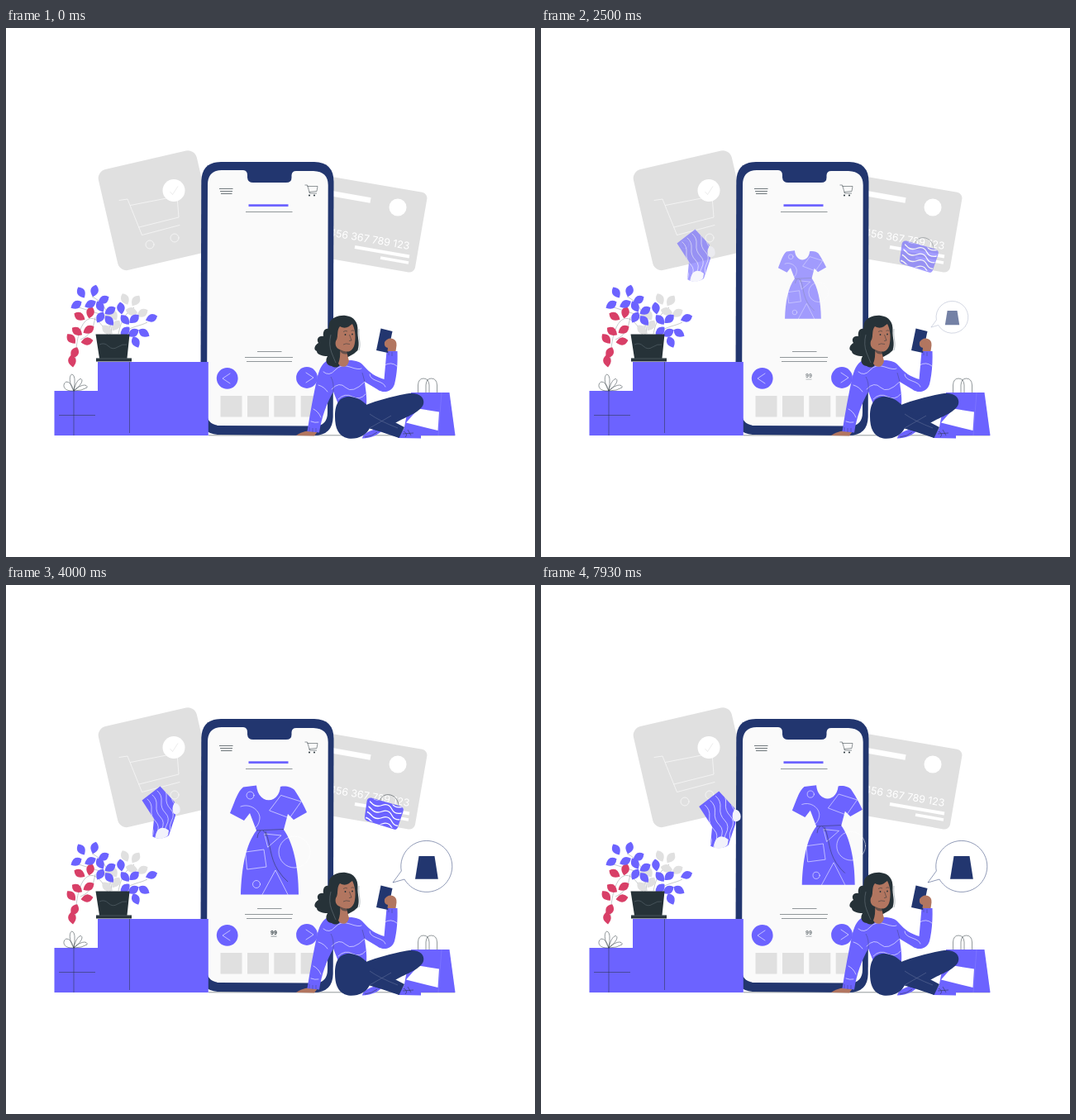
An HTML page that plays this animation: 640 by 640 pixels, repeating every 8 s.

```html
<!DOCTYPE html>
<html lang="en">
<head>
<meta charset="utf-8">
<title>Online shopping</title>
<style>
html, body { margin: 0; width: 100%; height: 100%; overflow: hidden; background: #fff; }
svg { display: block; width: 100vw; height: 100vh; }
.violet { fill: #6c63ff; }
.navy { fill: #22366f; }
.dark { fill: #263238; }
.skin { fill: #b27660; }
.grey { fill: #e0e0e0; }
.white { fill: #fff; }
.ink { fill: none; stroke: #263238; stroke-width: .5; }
.chalk { fill: none; stroke: #fff; stroke-width: .6; stroke-linecap: round; stroke-linejoin: round; }
text { font-family: Inter, sans-serif; }
</style>
</head>
<body>
<svg viewBox="0 0 640 640">
  <defs>
    <clipPath id="bagClip"><path d="M441 258L480.500 269L473 295.500L434.500 284Z"/></clipPath>
    <clipPath id="sockClip"><path id="sockShape" d="M164.500 260.500L186.500 243.500L204 262.500C203 268 205 272 205 279L197 303C192 307 183 308 177 304L179 283Z"/></clipPath>
  </defs>

  <g id="cardLeft">
    <rect class="grey" width="122" height="125" rx="11" transform="translate(109.500 173.500) rotate(-13)"/>
    <circle class="white" cx="203" cy="196.500" r="13.500"/>
    <path d="M198.500 198L201.500 201.500L208 191.500" fill="none" stroke="#e0e0e0" stroke-width=".6"/>
    <path class="chalk" d="M137 208.500L147 207L164.500 250.500L210 238.500M150.500 214.500L207 203.500L209 229L161 241"/>
    <circle class="chalk" cx="174" cy="262" r="5"/>
    <circle class="chalk" cx="204" cy="254" r="5"/>
  </g>

  <g id="cardRight">
    <rect class="grey" x="-150" width="150" height="98" rx="7" transform="translate(510.500 200) rotate(9.800)"/>
    <path d="M390 199.500L441 208.500" stroke="#fff" stroke-width="6.500"/>
    <circle class="white" cx="474" cy="217" r="10.500"/>
    <text class="white" font-size="12.400" text-anchor="end" transform="translate(487.500 268) rotate(9.800)">456 367 789 123</text>
    <path d="M422 265L488 276.500" stroke="#fff" stroke-width="4"/>
    <path d="M453 278L487 284" stroke="#fff" stroke-width="3.600"/>
  </g>

  <g id="bag">
    <path class="violet" d="M442 257.500Q437 257 436.500 262L434 280Q433.500 284 437 285.500L469 295.500Q473 297 474 293L480.500 274Q482 269 477 267.500Z"/>
    <g clip-path="url(#bagClip)"><path id="bagWaves" class="chalk" style="stroke-width:1.300"/></g>
    <path class="ink" d="M453 260.500C454 251 473 250 475 266.500"/>
  </g>

  <path class="ink" d="M245 492.800H543"/>

  <g id="phone">
    <path class="navy" d="M260 162H373Q396.500 162.500 396.500 186L395.700 470Q395.500 493 372 493L258 492Q235.300 491.500 235.300 469L236.300 185Q237 162 260 162Z"/>
    <path fill="#fafafa" d="M261 172L287 172Q292 172.500 292 178V181Q292.500 187 299 187H339Q345.500 187 345.500 181V178Q346 173 351 173H372Q389.500 173.500 389.700 190L389 465Q389 481.500 373 481.500L259 481Q243 480.500 243 465L244 189Q244.500 172 261 172Z"/>
    <path class="ink" style="stroke-width:.65" d="M258 194.500H274.500M259 197.500H274M260 200.500H273.500"/>
    <path class="ink" d="M361.500 190H364.500L367.500 200H376M364.500 191.500H377L376 197.500L366.500 198.500"/>
    <circle class="dark" cx="367" cy="202.500" r="1"/><circle class="dark" cx="373" cy="202.500" r="1"/>
    <path d="M293.500 214.700H341.500" stroke="#6c63ff" stroke-width="2.700"/>
    <path class="ink" d="M290 222.500H346.500M304 391.500H333.500M289 398.500H347M291 403.500H346"/>
    <circle class="violet" cx="267.700" cy="423.800" r="12.900"/>
    <circle class="violet" cx="364" cy="423" r="12.900"/>
    <path class="chalk" d="M271 418L262 424L271 430M363 417L372 423L363 429"/>
    <path class="grey" d="M259.500 445H285.500V470.500H259.500ZM292 445H318V470.500H292ZM324.300 445H350.300V470.500H324.300ZM356.700 445H382V470.500H356.700Z"/>
  </g>

  <g id="price">
    <text class="dark" x="324" y="422.800" font-size="6" font-weight="700" text-anchor="middle">99</text>
    <path class="ink" d="M320.500 425H327.500"/>
  </g>

  <g id="sock">
    <use href="#sockShape" class="violet"/>
    <g clip-path="url(#sockClip)"><path id="sockWaves" class="chalk"/></g>
    <path fill="#f2f2fb" d="M203.500 264C209 263 212 270 210 275Q206 279 202.500 276Q200 270 203.500 264Z"/>
    <path fill="#f2f2fb" d="M184 296Q190 291 197 297L196 303Q189 309 181 306Q181 300 184 296Z"/>
  </g>

  <g id="dress">
    <path class="violet" d="M287 244.500L303 242.500C305 266 330 266 332 244C339 242.500 346 245 349 248C355 257 360 266 364 275L348 284L341 277L336 296C347 311 354 340 354 374.500H284C285 342 290 314 303 297L295 276L288 285L271 276C276 264 280 250 287 244.500Z"/>
    <g class="chalk">
      <circle cx="295.500" cy="254.500" r="4.500"/>
      <path d="M284 268C294 264 306 271 307 281C307 287 304 293 300 295M333 254.500L357 262L343 282L319 273ZM313 301L333 303L317 317ZM290 323L312 320L315 341L292 344ZM310 374.500L326 345L341 374.500"/>
      <circle cx="349" cy="323" r="19"/>
      <circle cx="303" cy="362" r="4.500"/>
    </g>
    <path class="ink" d="M303 297L336 295.500M308 297Q304 301 304 306M311 297Q315 300 314 304M314 298C320 312 319 330 329 345Q335 354 341 359"/>
  </g>

  <g id="boxes">
    <path class="violet" d="M58.500 439H111V404H244.800V493H58.500Z"/>
    <path class="ink" d="M149.500 404V490M82 439V493M64 468.500H108"/>
    <path class="ink" d="M82 439C68 440 68 430 73 428Q79 428 82 439C75 428 77 419 80 419Q85 420 82 439C85 424 92 422 92 427Q91 432 82 439C91 430 99 431 98 435Q92 439 82 439"/>
  </g>

  <g id="plant">
    <path class="ink" opacity=".5" d="M128 370C126 350 122 334 104 325M126 350L88 338M136 370C140 350 146 345 155 338M126 372C126 357 120 346 130 341M142 370C149 361 162 361 171 356M142 371Q155 368 156 376M123 372C108 338 86 345 84 401M108 350Q105 372 90 377"/>
    <g id="leaves"></g>
    <path class="dark" d="M108.500 370.500H149.500L146.500 399.500H152V403.500H109V399.500H113Z"/>
    <path d="M113 383Q119 380 124 385T135 386T146 383M109 400H152" fill="none" stroke="#64727a" stroke-width=".5"/>
  </g>

  <g id="shopper">
    <path class="violet" d="M490 441H536.500L543.500 493H480Z"/>
    <path class="white" d="M499 460.500L524 464.500L522.500 487L484 477.500Z"/>
    <path d="M527 441L523 493" stroke="#8a83ff" stroke-width=".5"/>
    <path class="ink" d="M498.500 441V432Q499 424 505 424Q511.500 424 512 432V441M508 441V432Q508.500 424 514.500 424Q521 424 521.500 432V441"/>

    <path class="skin" d="M351 493Q358 488 366 487.500L377 488L373 493.500Z"/>
    <path class="violet" d="M392 401C383 404 380 411 377 421C372 443 368 466 364.500 488L379 489.500C382 470 388 454 396 440L402 455L436 456C437 446 435 438 434 428L449 437C457 443 467 440 470 431C473 419 474 405 473.500 391H460.500L457.500 425C447 422 440 417 433 409C429 404 424 402 415 402Z"/>
    <path class="chalk" d="M384 416Q391 422 398 414T416 410T430 412M378 432Q385 434 389 440M394 437Q403 427 411 435T434 428M372 461Q378 464 381 471M369 476Q374 478 378 477M440 419Q440 424 449 427T459 434M458 408Q466 403 473 409M402 449Q410 441 419 446T435 443"/>
    <path class="ink" d="M396 440Q397 429 393 422M434 428L431 417M367 483V488M371 484V489M375 484V489M463 392V396M467 392V397" opacity=".6"/>

    <path class="dark" d="M391 357C394 350 404 347 411 348C421 349 426 356 425.500 366C425 375 428.500 381 425.500 390L421 394L405 403C405 411 399 412 394 409C387 408 386 402 389 397C383 397 376 395 376 391C371 389 374 383 378 381C375 377 378 372 384 373C383 367 386 363 390 364Z"/>
    <path class="skin" d="M404 361C411 365 415 361 419 358C422 364 423.500 372 422 381C421 389 416 392 412 391.500L415 403C413 411 406 412 402 406Q405 398 404 389C399 388 397 381 400 377C402 373 400 365 404 361Z"/>
    <path class="dark" d="M404 389Q408 391 412 391.500L413 394Q408 396 404 391Z" opacity=".55"/>
    <circle class="dark" cx="410.500" cy="371" r=".9"/><circle class="dark" cx="419" cy="370.500" r=".9"/>
    <path class="ink" d="M408 367.500Q411 365.500 413 367M417.500 366.500Q419 365 421 366.500M415.500 371L418 378L415 378.500M408 383Q411 381 416 382.500"/>
    <path d="M427 364C426 376 430 381 427 390M393 371Q390 383 394 393T399 405" fill="none" stroke="#76838a" stroke-width=".5"/>

    <path class="navy" d="M453.500 363.500L467.500 367L462 393L448 390Z"/>
    <path class="skin" d="M458 380Q462 374 468 376Q473 378 472.500 384L471.500 391H461.500L462 387Q457 386 458 380Z"/>

    <path class="violet" d="M431 496C433 489 442 487 450 484L454 488C449 493 441 496 431 496.500ZM474 496L482 484Q488 491 502 492V496.500Z"/>
    <path class="navy" d="M424 462C440 452 470 445 488 442C500 441 507 447 505 455C502 464 486 470 478 474L452 488L438 484Z"/>
    <path class="navy" d="M398 470C398 450 407 445 417 446C430 448 436 455 442 462L482 483L475.500 496L440 484C436 493 425 498 414 496.500C402 494 398 484 398 470Z"/>
    <path d="M440 484L466 469M440 467Q451 475 474 484" fill="none" stroke="#68779e" stroke-width=".5"/>
    <path class="ink" d="M481 488Q487 491 483 495M486 486L490 493M480 491L493 490M434 495Q443 494 449 489"/>
  </g>

  <g id="bubble">
    <path d="M478.300 346L468 360L482 356A31 31 0 1 0 478.300 346Z" fill="#fff" stroke="#22366f" stroke-width=".5"/>
    <path class="navy" d="M499.500 328H518.500L522.800 355.700H495Z"/>
  </g>
</svg>
<script>
const LOOP = 8000, ENTER = 4000, LEAVE = 7000;
const el = id => document.getElementById(id);
const [dress, sock, bag, bubble, price] = ["dress", "sock", "bag", "bubble", "price"].map(el);

// x, y of the middle, then the angle
const foliage = {
  "#e0e0e0": [[144,328,-25],[157,330,35],[152,343,-75],[165,345,60],[130,347,-30],[133,360,35],[122,365,-45],[124,350,-20]],
  "#d83f67": [[89,349,-60],[102,344,12],[86,367,-55],[100,365,60],[79,376,-40],[98,379,80],[83,393,25],[80,403,-8]],
  "#6c63ff": [[91,320,-30],[107,318,15],[85,335,60],[102,334,65],[118,329,60],[114,337,-30],[126,342,60],[114,350,30],
              [125,354,-40],[139,339,-8],[144,353,-40],[155,352,50],[144,367,45],[154,369,60],[167,369,-60],[176,351,70],[157,380,-25]]
};

function drawLeaves() {
  let out = "";
  for (const [color, spots] of Object.entries(foliage))
    for (const [x, y, a] of spots)
      out += `<path fill="${color}" transform="translate(${x} ${y}) rotate(${a})" d="M0 -7.500Q9.500 -1 0 7.500Q-9.500 -1 0 -7.500Z"/>`;
  el("leaves").innerHTML = out;
}

function drawWaves() {
  let d = "";
  for (let i = 0; i < 5; i++)
    d += `M430 ${251 + i * 7.5}q7 -1 12 5t13 3t12 5t17 3`;
  el("bagWaves").setAttribute("d", d);
  d = "";
  for (let i = 0; i < 6; i++)
    d += `M${165 + i * 6} ${264 - i * 5}q6 5 5 13t5 14t1 15t4 18`;
  el("sockWaves").setAttribute("d", d);
}

// Scale about (cx, cy), then shift
function place(node, cx, cy, scale, dx = 0, dy = 0) {
  node.setAttribute("transform", `translate(${cx + dx} ${cy + dy}) scale(${scale}) translate(${-cx} ${-cy})`);
}

function render(t) {
  const p = Math.min(t / ENTER, 1);
  const q = Math.max((t - LEAVE) / (LOOP - LEAVE), 0);
  for (const node of [dress, sock, bag, bubble]) node.setAttribute("opacity", p);
  price.setAttribute("opacity", p * (1 - 0.3 * q));
  if (q > 0) place(dress, 317.5, 308.5, 1 - 0.0925 * q, 31 * q, -6.5 * q);
  else place(dress, 313.5, 314, p);
  place(sock, 187.5, 275, 1 + 0.1 * q, 31 * q, 9.5 * q);
  place(bag, 457.5, 275, 1 - 0.09 * q, -95 * q);
  place(bubble, 478.5, 365.5, p);
}

drawLeaves();
drawWaves();
const start = performance.now();
function tick() {
  render((performance.now() - start) % LOOP);
  requestAnimationFrame(tick);
}
render(0);
requestAnimationFrame(tick);
</script>
</body>
</html>
```
